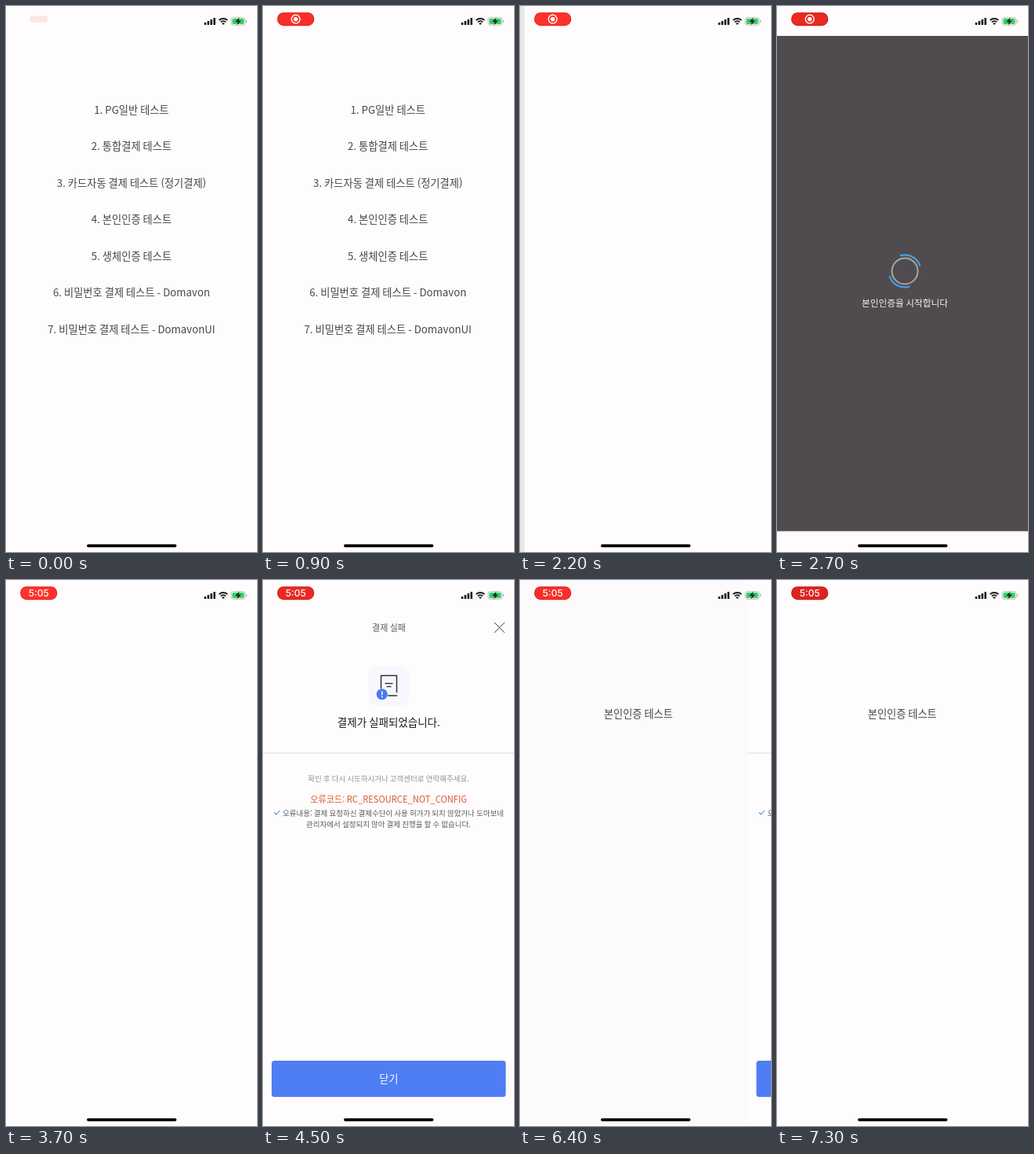
Recreate the animation shown at these times as an HTML page with a canvas. Size 320x694 px, loop 7.4 s.

```html
<!DOCTYPE html>
<html lang="ko">
<head>
<meta charset="utf-8">
<title>본인인증 테스트</title>
<style>
html, body { margin: 0; width: 100%; height: 100%; overflow: hidden; background: #fefcfd; }
canvas { display: block; width: 320px; height: 694px; }
</style>
</head>
<body>
<canvas id="stage"></canvas>
<script>
const W = 320, H = 694, LOOP = 7400;
const PAPER = '#fefcfd';
const FONT = '"Noto Sans CJK KR", "Noto Sans CJK", sans-serif';
const MENU = [
  '1. PG일반 테스트',
  '2. 통합결제 테스트',
  '3. 카드자동 결제 테스트 (정기결제)',
  '4. 본인인증 테스트',
  '5. 생체인증 테스트',
  '6. 비밀번호 결제 테스트 - Domavon',
  '7. 비밀번호 결제 테스트 - DomavonUI'
];
const PUSH_TEST = { start: 900, length: 500 };
const PUSH_PAY = { start: 1820, length: 600 };
const POP_PAY = { start: 6150, length: 560 };
const LOADER = [2500, 3500];
const RESULT_AT = 4400;
const CLOCK_AT = 3200;
// [time, brightness] of the recording badge
const PULSE = [[0, 0.6], [700, 1], [1400, 0], [2150, 1], [2800, 0.3], [3700, 1],
  [4700, 0.3], [5700, 1], [6500, 0.8], [7300, 0], [7400, 0]];

const canvas = document.getElementById('stage');
const ctx = canvas.getContext('2d');
const dpr = window.devicePixelRatio || 1;
canvas.width = W * dpr;
canvas.height = H * dpr;

const clamp = v => Math.max(0, Math.min(1, v));
const mix = (a, b, k) => a + (b - a) * k;
const glide = (t, move) => 1 - (1 - clamp((t - move.start) / move.length)) ** 4;

// y is the optical middle of the line
function text(s, x, y, size, color, weight = 400, align = 'center', font = FONT) {
  ctx.font = `${weight} ${size}px ${font}`;
  ctx.textAlign = align;
  ctx.fillStyle = color;
  ctx.fillText(s, x, y + size * 0.37);
}

function box(x, y, w, h, r, color) {
  ctx.beginPath();
  ctx.roundRect(x, y, w, h, r);
  ctx.fillStyle = color;
  ctx.fill();
}

function disc(x, y, r, color) {
  ctx.beginPath();
  ctx.arc(x, y, r, 0, Math.PI * 2);
  ctx.fillStyle = color;
  ctx.fill();
}

function arc(x, y, r, from, to, width, color) {
  ctx.beginPath();
  ctx.arc(x, y, r, from, to);
  ctx.lineWidth = width;
  ctx.strokeStyle = color;
  ctx.stroke();
}

function line(points, width, color) {
  ctx.beginPath();
  points.forEach(([x, y]) => ctx.lineTo(x, y));
  ctx.lineWidth = width;
  ctx.strokeStyle = color;
  ctx.stroke();
}

function paper() {
  ctx.fillStyle = PAPER;
  ctx.fillRect(0, 0, W, H);
}

function menuPage() {
  paper();
  MENU.forEach((s, i) => text(s, 160, 132 + i * 46.5, 13.25, '#484648', 300));
}

function testPage() {
  paper();
  text('본인인증 테스트', 159.8, 170.5, 13.2, '#484648', 300);
}

function loader(t) {
  ctx.fillStyle = '#4f4b4e';
  ctx.fillRect(0, 38, W, 629.5);
  const x = 163, y = 337;
  arc(x, y, 16.5, 0, Math.PI * 2, 2, '#aaa7a8');
  const turn = (t - 2700) / 1000 * Math.PI * 2 - Math.PI * 0.35;
  for (const a of [turn, turn + Math.PI]) {
    arc(x, y, 20.5, a - Math.PI / 4, a + Math.PI / 4, 2.2, '#4a9fe6');
  }
  text('본인인증을 시작합니다', x, 377.5, 11.7, '#f4f2f3');
}

function receipt() {
  box(134.5, 109, 52, 52, 13, '#f7f8fe');
  ctx.lineJoin = 'round';
  line([[150.5, 138], [150.5, 121.5], [170.5, 121.5], [170.5, 143]], 1.5, '#333');
  line([[159, 147], [171.2, 147]], 1.5, '#333');
  line([[155.5, 131.5], [165.5, 131.5]], 1.4, '#333');
  line([[157.5, 135.5], [163.5, 135.5]], 1.4, '#333');
  disc(151.7, 145.2, 7, '#4a79ee');
  box(151, 141.3, 1.5, 5, 0.6, '#fff');
  disc(151.75, 148.4, 0.9, '#fff');
}

function resultPage() {
  text('결제 실패', 160.5, 60.5, 11, '#5c5a5c');
  line([[295, 54], [308, 67]], 1, '#444');
  line([[308, 54], [295, 67]], 1, '#444');
  receipt();
  text('결제가 실패되었습니다.', 160.3, 181, 13.5, '#1c1b1c');
  ctx.fillStyle = '#dddbdd';
  ctx.fillRect(0, 219.5, W, 1);
  text('확인 후 다시 시도하시거나 고객센터로 연락해주세요.', 160, 252.5, 9.5, '#959395');
  text('오류코드: RC_RESOURCE_NOT_CONFIG', 160, 278.5, 11.15, '#d8582f');
  line([[14.5, 295.5], [17, 298], [21.5, 293]], 1.1, '#4a92d8');
  text('오류내용: 결제 요청하신 결제수단이 사용 허가가 되지 않았거나 도마보네', 166, 296, 9.5, '#5c5a5c');
  text('관리자에서 설정되지 않아 결제 진행을 할 수 없습니다.', 160, 310, 9.5, '#5c5a5c');
  box(11, 611, 298.5, 46, 3.5, '#4f7df3');
  text('닫기', 160.3, 634, 13.2, '#fff');
}

function payPage(t) {
  paper();
  if (t >= RESULT_AT) resultPage();
  else if (t >= LOADER[0] && t < LOADER[1]) loader(t);
}

// k = 0: only the lower page, k = 1: only the upper one
function stack(k, lower, upper) {
  if (k < 1) {
    ctx.save();
    ctx.translate(-W * 0.3 * k, 0);
    lower();
    ctx.fillStyle = PAPER;
    ctx.fillRect(W, 0, W * 0.3, H);
    ctx.restore();
    ctx.fillStyle = `rgba(0,0,0,${0.09 * k})`;
    ctx.fillRect(0, 0, W, H);
  }
  if (k > 0) {
    ctx.save();
    ctx.translate(W * (1 - k), 0);
    upper();
    ctx.restore();
  }
}

function pulse(t) {
  const i = Math.max(1, PULSE.findIndex(p => p[0] > t));
  const [t0, a] = PULSE[i - 1], [t1, b] = PULSE[i];
  const k = (t - t0) / (t1 - t0);
  return mix(a, b, k * k * (3 - 2 * k));
}

function badge(t) {
  const grow = clamp((t - 60) / 340);
  const glow = pulse(t);
  ctx.save();
  ctx.translate(41.7, 16.7);
  const s = mix(0.5, 1, grow);
  ctx.scale(s, s);
  ctx.globalAlpha = mix(0.05, 1, grow);
  const shade = (dark, bright) =>
    `rgb(${dark.map((v, i) => Math.round(mix(v, bright[i], glow)))})`;
  box(-23.5, -8.5, 47, 17, 8, shade([190, 28, 24], [214, 36, 30]));
  box(-22.5, -7.5, 45, 15, 7, shade([222, 36, 30], [254, 50, 42]));
  if (t < CLOCK_AT) {
    arc(0, 0, 5.4, 0, Math.PI * 2, 1.4, '#fff');
    disc(0, 0, 2.7, '#fff');
  } else {
    text('5:05', 0, 0.1, 12, '#fff', 500, 'center', 'Inter, sans-serif');
  }
  ctx.restore();
}

function statusBar() {
  const ink = '#1d1c1d';
  for (let i = 0; i < 4; i++) {
    const h = 3 + i * 2;
    box(252.7 + i * 3.9, 24 - h, 2.6, h, 0.6, ink);
  }
  const up = -Math.PI / 2, spread = Math.PI * 0.25;
  for (const r of [4.4, 7.6]) arc(277, 23.6, r, up - spread, up + spread, 1.8, ink);
  ctx.beginPath();
  ctx.moveTo(277, 24);
  ctx.arc(277, 24, 2.6, up - spread, up + spread);
  ctx.fillStyle = ink;
  ctx.fill();

  ctx.beginPath();
  ctx.roundRect(287, 14.7, 18, 9.6, 2.8);
  ctx.lineWidth = 0.9;
  ctx.strokeStyle = '#aeb8b0';
  ctx.stroke();
  box(288.4, 16.1, 15.2, 6.8, 1.6, '#35d062');
  box(306, 17.8, 1.2, 3.4, 0.6, '#aeb8b0');
  ctx.beginPath();
  [[297.6, 14.4], [292.2, 20.2], [295.6, 20.2], [294.4, 24.6], [299.8, 18.6], [296.4, 18.6]]
    .forEach(([x, y]) => ctx.lineTo(x, y));
  ctx.closePath();
  ctx.fillStyle = ink;
  ctx.fill();
}

function draw(t) {
  ctx.setTransform(dpr, 0, 0, dpr, 0, 0);
  if (t < PUSH_PAY.start) {
    stack(glide(t, PUSH_TEST), menuPage, testPage);
  } else {
    const k = glide(t, PUSH_PAY) - glide(t, POP_PAY);
    stack(k, testPage, () => payPage(t));
  }
  badge(t);
  statusBar();
  box(103, 684.3, 114.5, 3.6, 1.8, '#000');
}

const begin = performance.now();
function tick() {
  draw((performance.now() - begin) % LOOP);
  requestAnimationFrame(tick);
}
tick();
</script>
</body>
</html>
```
